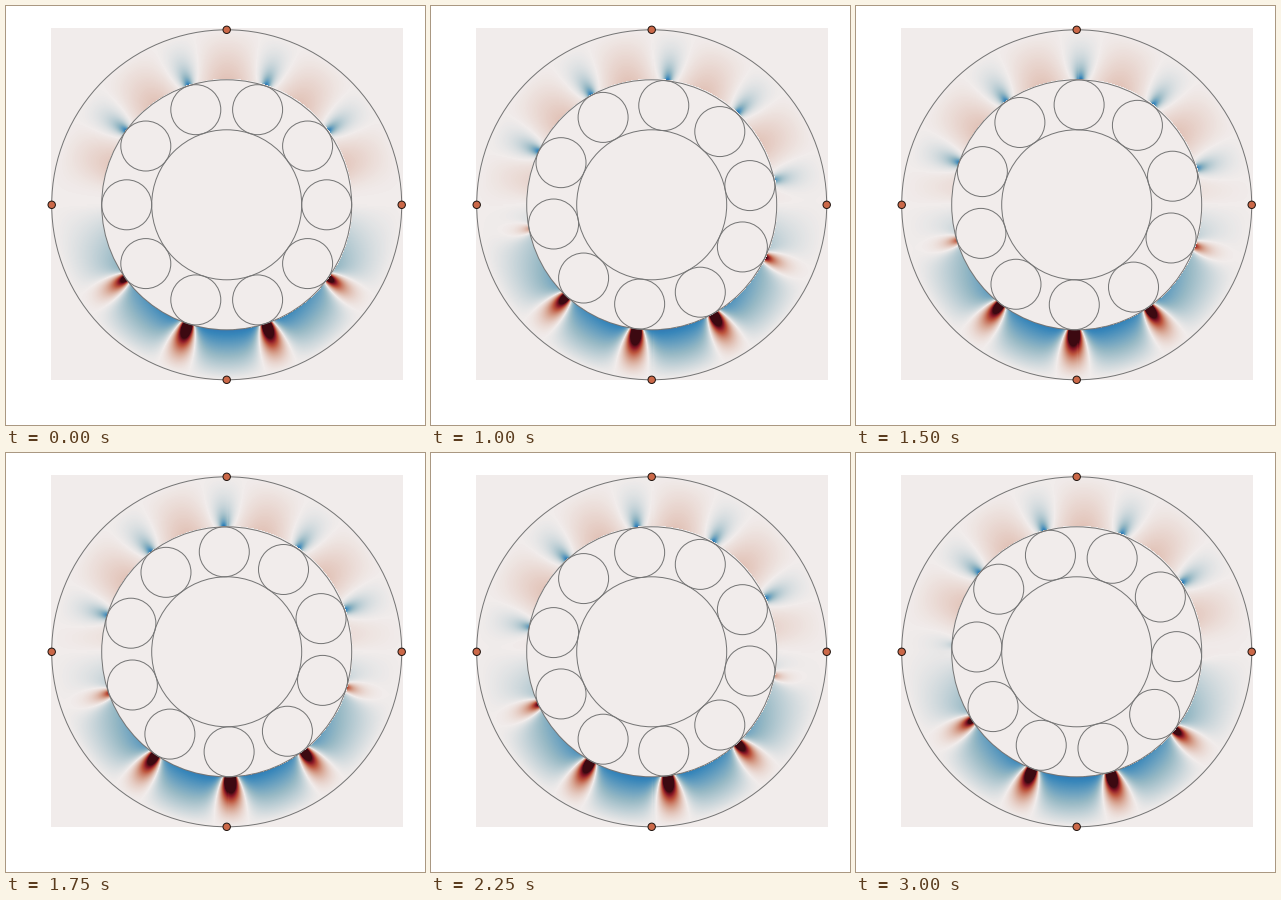
A matplotlib script for the animation above (3.25 s loop, 419x419 px).

```python
import numpy as np
import matplotlib.pyplot as plt
from matplotlib.animation import FuncAnimation
from matplotlib.colors import LinearSegmentedColormap
from matplotlib.patches import Circle

SIZE, DPI = 419, 100
LEFT, TOP, SIDE = 45, 23, 351
CX, CY = 220.7, 198.8
R_SHAFT, R_PITCH, R_IN, R_OUT, R_BALL = 75, 100, 125, 175, 25
FRAMES, STEP_MS = 13, 250
N_BALLS = 10
PITCH = 2 * np.pi / N_BALLS

cmap = LinearSegmentedColormap.from_list(
    "balance", ["#171c42", "#1e4ba0", "#3786ba", "#97b9c5", "#f1eceb",
                "#d7a491", "#be573f", "#8c1926", "#3c0911"], N=513)

# Stress map cells in polar form, one per pixel
cells = np.arange(SIDE) + 0.5
X, Y = np.meshgrid(LEFT + cells - CX, CY - TOP - cells)
R, THETA = np.hypot(X, Y), np.arctan2(Y, X)
RING = (R >= R_IN) & (R <= R_OUT)
DEPTH = np.clip(R - R_IN, 0, R_OUT - R_IN)
TAPER = 1 - DEPTH / (R_OUT - R_IN)


def split(theta, above, below):
    """Choose a rule by side; each takes the height |sin(theta)|."""
    s = np.sin(theta)
    return np.where(s > 0, above(abs(s)), below(abs(s)))


def ball_load(theta):
    return split(theta, lambda s: -0.11 * np.tanh(5 * s), lambda s: s ** 1.6)


HOOP = TAPER * split(THETA, lambda s: 0.14 * np.tanh(4 * s), lambda s: -0.55 * s)


def stress(phase):
    between = (1 - np.cos(N_BALLS * (THETA - phase))) / 2
    field = np.where(HOOP > 0, HOOP * between, HOOP)
    reach = DEPTH + 10
    for k in range(N_BALLS):
        a = phase + k * PITCH
        arc = R * np.angle(np.exp(1j * (THETA - a)))
        spread = (1 + (arc / (0.66 * reach)) ** 2) ** -3
        field = field + 53 * ball_load(a) * TAPER / reach * spread
    return np.where(RING, field, 0)


def circle(x, y, r, **style):
    style = {"fc": "none", "ec": "#757575", "lw": 0.72, **style}
    return ax.add_patch(Circle((x, y), r, **style))


fig = plt.figure(figsize=(SIZE / DPI, SIZE / DPI), dpi=DPI, facecolor="white")
ax = fig.add_axes([0, 0, 1, 1])
ax.axis("off")
image = ax.imshow(stress(0), cmap=cmap, vmin=-1, vmax=1, interpolation="nearest",
                  aspect="auto", extent=(LEFT, LEFT + SIDE, TOP + SIDE, TOP))
for radius in (R_SHAFT, R_IN, R_OUT):
    circle(CX, CY, radius)
balls = [circle(CX, CY, R_BALL) for _ in range(N_BALLS)]
for dx, dy in ((0, -1), (1, 0), (0, 1), (-1, 0)):
    circle(CX + R_OUT * dx, CY + R_OUT * dy, 3.7, fc="#cb6848", ec="#201510", zorder=5)
ax.set_xlim(0, SIZE)
ax.set_ylim(SIZE, 0)


def update(i):
    phase = PITCH * i / FRAMES
    image.set_data(stress(phase))
    for k, ball in enumerate(balls):
        a = phase + k * PITCH
        ball.set_center((CX + R_PITCH * np.cos(a), CY - R_PITCH * np.sin(a)))
    return [image, *balls]


anim = FuncAnimation(fig, update, frames=FRAMES, interval=STEP_MS,
                     repeat=True, repeat_delay=0)
plt.show()
```
